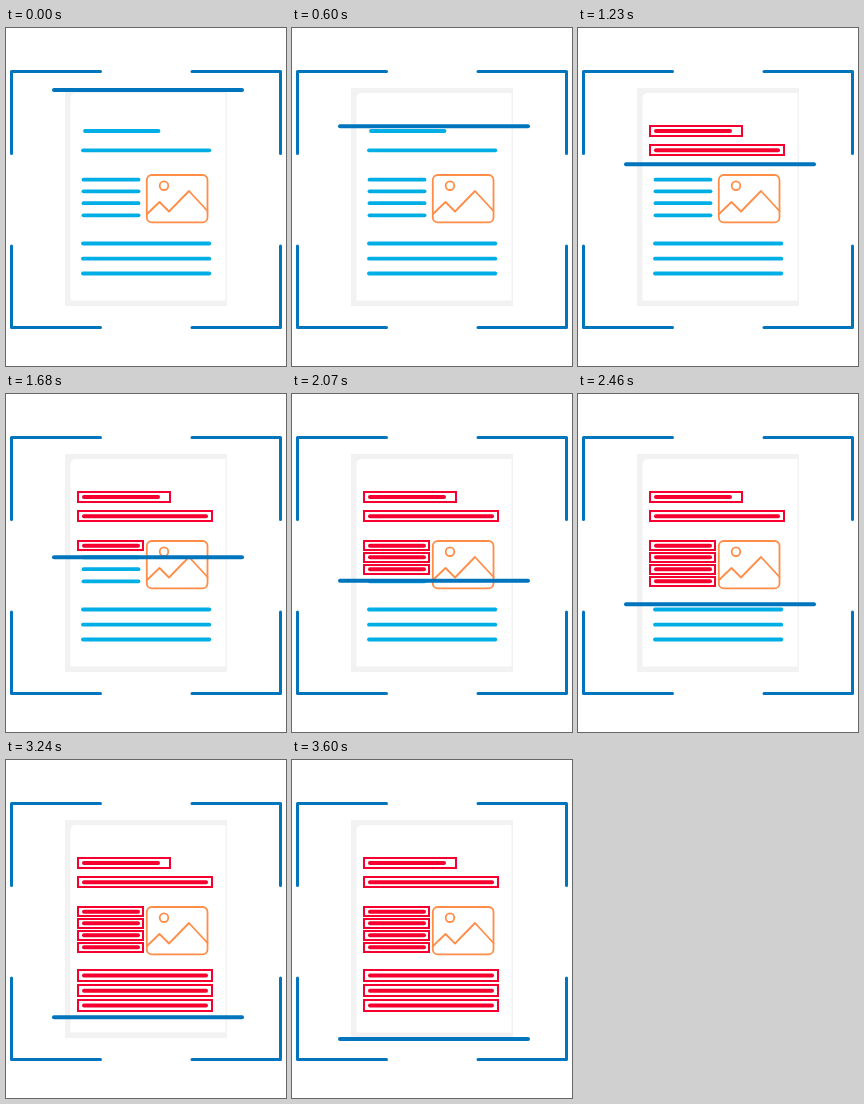
An HTML page for the animation above (3.97 s loop, 280 by 338 pixels).

```html
<!DOCTYPE html>
<html lang="en">
<head>
<meta charset="utf-8">
<title>Document scan</title>
<style>
  html, body { margin: 0; height: 100%; overflow: hidden; background: #fff; }
  svg { display: block; width: 100vw; height: 100vh; fill: none; stroke-linecap: round; stroke-linejoin: round; }
  .plain { stroke: #00aee6; stroke-width: 3.8; }
  .found { stroke: #f5002f; stroke-width: 4; }
  .found rect { fill: #fff; stroke-width: 2; stroke-linejoin: miter; }
</style>
</head>
<body>
<svg viewBox="0 0 280 338">
  <path fill="#f2f2f2" d="M59 60H221V278H59Z"/>
  <path fill="#fff" d="M64.5 272.5V70Q65 65 70 65H219.5V272.5Z"/>
  <g id="text"></g>
  <g stroke="#ff8c47" stroke-width="1.8">
    <rect x="140.8" y="147" width="60.7" height="47.4" rx="5"/>
    <circle cx="158" cy="157.7" r="4.3"/>
    <path d="M141 186L153.5 174L163 183.500L183 163L201.500 183"/>
  </g>
  <g stroke="#0075be">
    <path stroke-width="3" d="M94.500 43.500H5.500V125.500M186 43.500H274.500V125.500M5.500 218V299.500H94.500M274.500 218V299.500H186"/>
    <path id="scan" stroke-width="4" d="M48 0H236"/>
  </g>
</svg>
<script>
const LOOP = 3970, SWEEP = 3600, STEP = 30, TOP = 62, BOTTOM = 279;

// Text lines: y, start and end when plain, end when found, box right edge, box height
const wide = (y, h = 11) => [y, 77, 203.3, 200, 206, h];
const short = y => [y, 77.5, 132.5, 132, 137, 9];
const lines = [
  [103, 79, 152.500, 152, 164, 10],
  wide(122.300, 10),
  ...[151.700, 163.300, 175.200, 187.300].map(short),
  ...[215.500, 230.700, 245.500].map(y => wide(y))
];

const text = document.getElementById('text');
text.innerHTML = lines.map(([y, x, end, foundEnd, right, h]) => `
  <path class="plain" d="M${x} ${y}H${end}"/>
  <g class="found">
    <rect x="72" y="${Math.round(y - h / 2)}" width="${right - 72}" height="${h}"/>
    <path d="M78 ${y}H${foundEnd}"/>
  </g>`).join('');
const found = text.querySelectorAll('.found');
const scan = document.getElementById('scan');

function draw(now) {
  const time = Math.min(Math.floor(now % LOOP / STEP) * STEP, SWEEP);
  const y = TOP + (BOTTOM - TOP) * time / SWEEP;
  scan.setAttribute('transform', `translate(0 ${y})`);
  found.forEach((g, i) => g.setAttribute('visibility', y > lines[i][0] + 3 ? 'visible' : 'hidden'));
  requestAnimationFrame(() => draw(performance.now() - start));
}
const start = performance.now();
draw(0);
</script>
</body>
</html>
```
